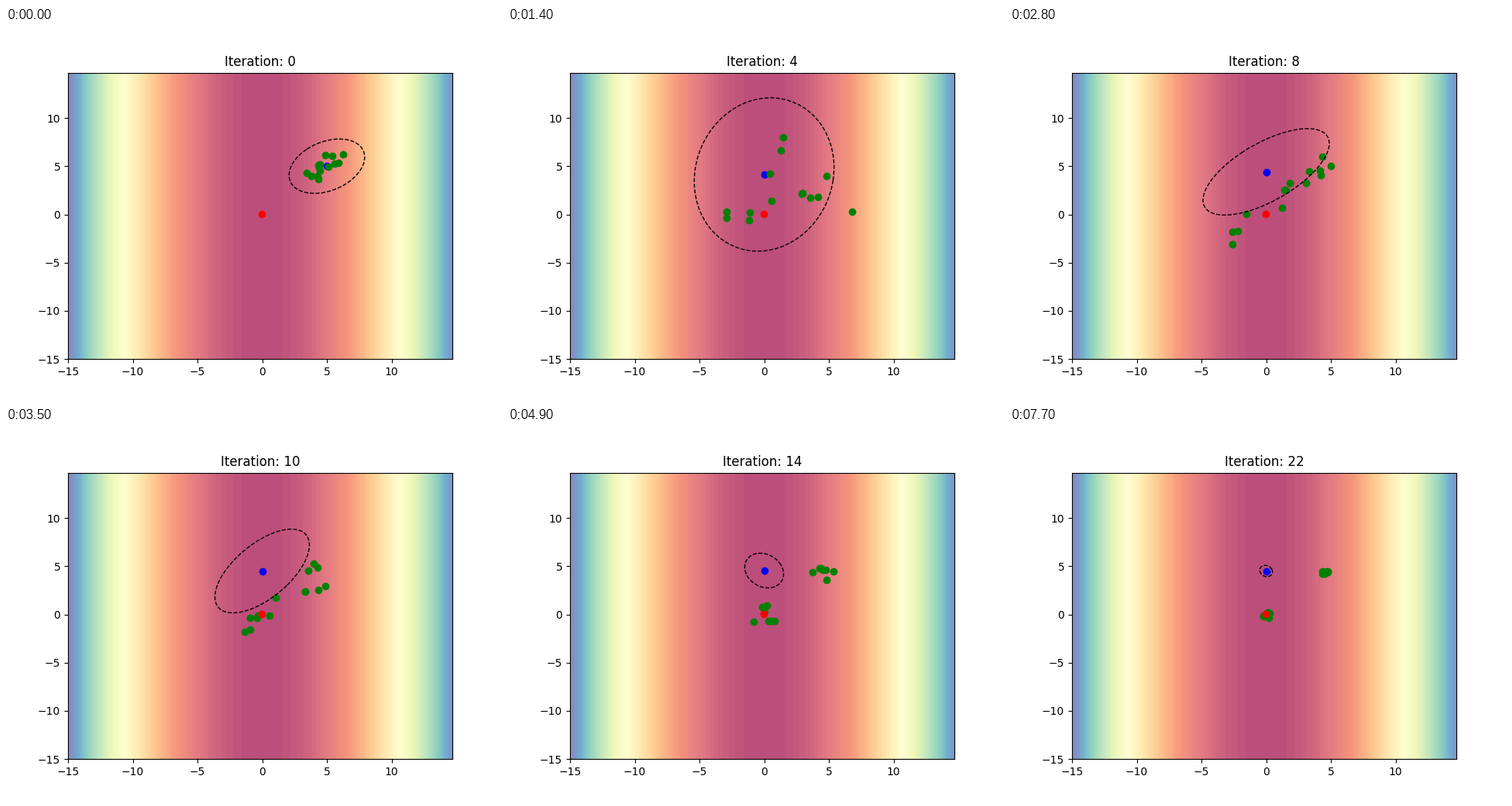
A matplotlib script that plays this animation: 640 by 480 pixels, repeating every 8000 ms.

```python
import numpy as np
import matplotlib.pyplot as plt
from matplotlib.animation import FuncAnimation
from matplotlib.patches import Ellipse

TICK, HOLD, LOOP = 50, 350, 8000
LO, HI = -15, 14.7
SETTLE = 4  # iterations until the mean reaches x = 0

# Key shapes: iteration, mean y, half width, half height, correlation
KEYS = np.array([
    (0, 5.00, 2.92, 2.82, 0.33),
    (3, 4.25, 7.54, 9.80, 0.15),
    (4, 4.14, 5.40, 7.95, 0.09),
    (6, 4.33, 6.11, 4.62, 0.69),
    (10, 4.50, 3.65, 4.34, 0.62),
    (12, 4.46, 4.91, 5.38, -0.25),
    (13, 4.50, 5.25, 5.90, -0.20),
    (14, 4.55, 1.50, 1.80, -0.20),
    (17, 4.66, 0.96, 0.64, -0.50),
    (22, 4.50, 0.49, 0.59, -0.15),
])


def state(i):
    """Mean and covariance of the search ellipse at iteration i."""
    my, wx, wy, rho = (np.interp(i, KEYS[:, 0], col) for col in KEYS[:, 1:].T)
    mx = 2.5 * (1 + np.cos(np.pi * min(i / SETTLE, 1)))
    cross = rho * wx * wy
    return mx, my, np.array([[wx * wx, cross], [cross, wy * wy]])


def samples(i):
    """Seven points around (mx, mx) and seven around (my, my)."""
    mx, my, cov = state(i)
    z = np.random.default_rng(i).normal(size=(14, 2)).clip(-1.6, 1.6)
    root = np.linalg.cholesky(cov) / 3
    return np.repeat([mx, my], 7)[:, None] + z @ root.T


fig, ax = plt.subplots(figsize=(6.4, 4.8), dpi=100)

X, Y = np.meshgrid(np.arange(-15, 15, 0.3), [LO, HI])
ax.contourf(X, Y, X ** 2, 100, cmap="Spectral", alpha=0.7)
ax.set_xlim(LO, HI)
ax.set_ylim(LO, HI)

mean_dot, = ax.plot([], [], "o", color="blue", zorder=2)
dots, = ax.plot([], [], "o", color="green", zorder=2.1)
ax.plot([-0.03], [0.02], "o", color="red", zorder=2.2)
ring = ax.add_patch(Ellipse((0, 0), 1, 1, fill=False, ec="black",
                            ls="--", lw=1, zorder=2.3))
title = ax.set_title("")


def draw(frame):
    i = frame * TICK // HOLD
    mx, my, cov = state(i)
    val, vec = np.linalg.eigh(cov)
    ring.set_center((mx, my))
    ring.width, ring.height = 2 * np.sqrt(val[::-1])
    ring.angle = np.degrees(np.arctan2(vec[1, 1], vec[0, 1]))
    mean_dot.set_data([mx], [my])
    dots.set_data(*samples(i).T)
    title.set_text(f"Iteration: {i}")
    return ring, mean_dot, dots, title


anim = FuncAnimation(fig, draw, frames=LOOP // TICK, interval=TICK,
                     repeat=True, repeat_delay=0)
plt.show()
```
